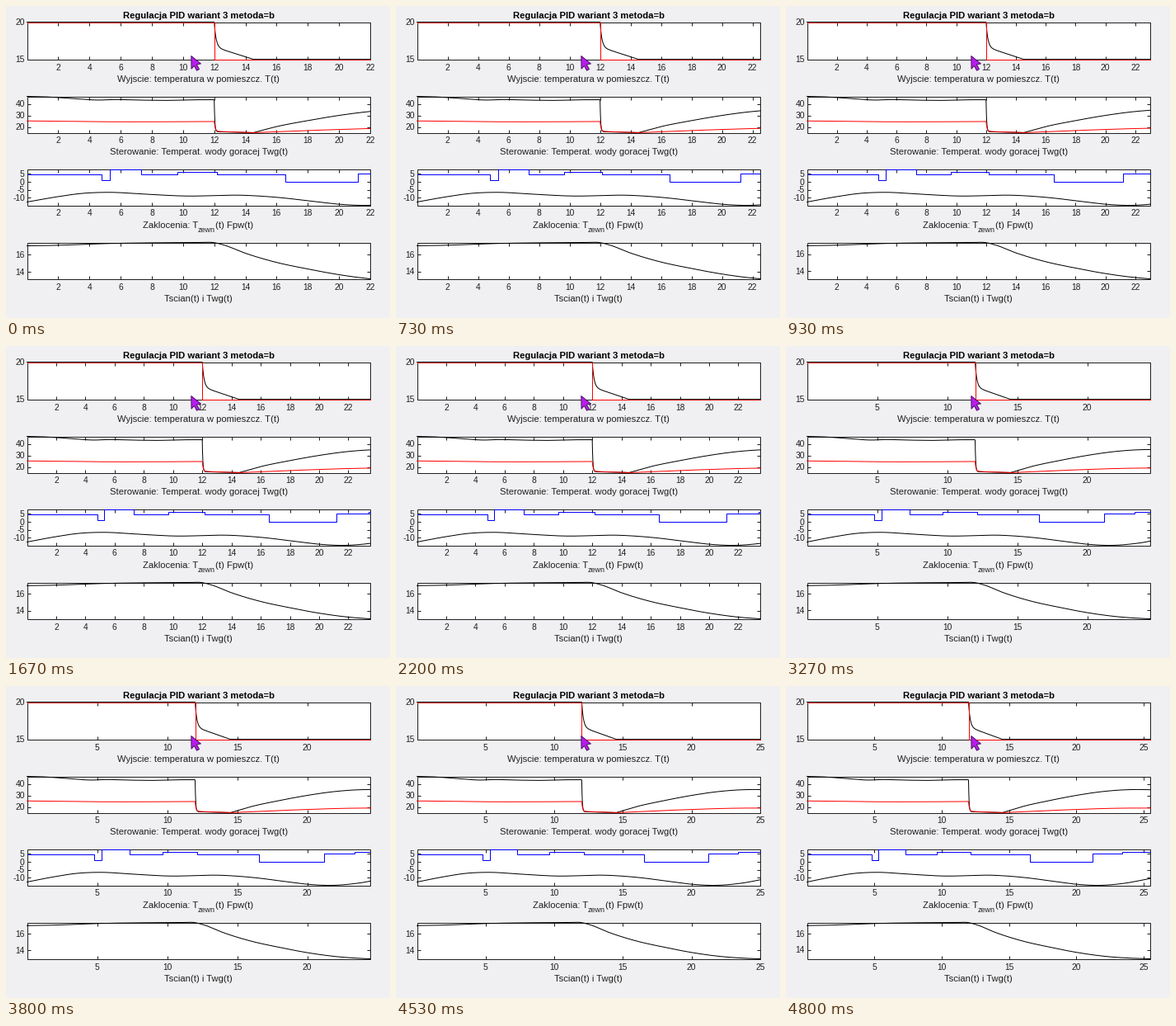
Write a matplotlib script that moves like this. It is 466x378 px and loops after 4990 ms.

```python
import numpy as np
import matplotlib.pyplot as plt
from matplotlib.animation import FuncAnimation
from matplotlib.collections import LineCollection
from matplotlib.patches import Polygon

WIDTH, HEIGHT, DPI = 466, 378, 100
PX = 72 / DPI                       # points per pixel
LOOP_MS, STEP_MS = 4990, 10
LEFT, RIGHT = 25.5, 442.0
STARTS = [0, 200, 930, 1670, 2470, 3270, 4000, 4800]
INK = "#202020"

plt.rcParams["font.family"] = "Liberation Sans"


def smooth(points, t):
    """Cubic Hermite curve through a few (time, value) points."""
    x, y = np.array(points, float).T
    slope = np.gradient(y, x)
    i = np.clip(np.searchsorted(x, t, "right") - 1, 0, len(x) - 2)
    h = x[i + 1] - x[i]
    s = (t - x[i]) / h
    return ((1 + 2 * s) * (1 - s) ** 2 * y[i] + s * (1 - s) ** 2 * h * slope[i]
            + s * s * (3 - 2 * s) * y[i + 1] + s * s * (s - 1) * h * slope[i + 1])


def steps(edges, levels):
    """Vertices of a staircase with the given inner edges."""
    x = np.repeat([0, *edges, 25.5], 2)[1:-1]
    return x, np.repeat(levels, 2)


t = np.arange(0, 25.501, 0.02)
decay = np.exp(-np.maximum(t - 12, 0) / 0.12)
fading = np.clip((14.5 - t) / 2.5, 0, 1)

room = np.where(t < 12, 20, 15 + 1.65 * fading + 3.35 * decay)
water_day = smooth([(0, 46.5), (1, 46.2), (3, 44.6), (4.6, 43.3), (5.5, 43.7),
                    (7.5, 43.2), (9, 43), (10.5, 43.5), (12, 43.6)], np.minimum(t, 12))
water_night = smooth([(14.5, 15), (16, 20.3), (18, 25.5), (20, 30), (22, 33.4),
                      (23.5, 34.8), (24.7, 35.1), (25.5, 34.9)], np.maximum(t, 14.5))
water = np.where(t < 12, water_day, water_night + 0.9 * fading + 27 * decay ** 3)
back_day = smooth([(0, 25.2), (2, 25), (5, 24.5), (9, 24.5), (12, 24.7)], np.minimum(t, 12))
back_night = smooth([(14.5, 15), (18, 16.9), (20, 17.8), (22, 18.6), (24, 19),
                     (25.5, 19)], np.maximum(t, 14.5))
back = np.where(t < 12, back_day, back_night + 1.2 * fading + 8.5 * decay ** 2)
outside = smooth([(0, -12.7), (2, -9.3), (3.5, -7.3), (5.2, -6.6), (7.5, -7.7),
                  (10, -8.9), (14, -8.5), (16.5, -10.2), (18, -11.9), (20, -14.1),
                  (21.7, -14.8), (23.5, -13.6), (25.5, -10.5)], t)
wall = smooth([(0, 17), (1, 17.02), (3, 17.12), (5, 17.25), (8, 17.34), (11, 17.37),
               (12, 17.36), (12.6, 17.1), (14, 16.15), (16, 15.1), (18, 14.35),
               (20, 13.7), (22, 13.23), (24, 12.98), (25.5, 12.9)], t)
flow = steps([4.8, 5.3, 7.3, 9.65, 12.15, 16.55, 21.2, 23.4],
             [4.7, 1, 8.1, 4.5, 6.2, 4.6, 0, 5, 6.4])

fig = plt.figure(figsize=(WIDTH / DPI, HEIGHT / DPI), dpi=DPI, facecolor="#f0eff1")
ax = fig.add_axes([0, 0, 1, 1])
ax.set(xlim=(0, WIDTH), ylim=(HEIGHT, 0))
ax.axis("off")


def write(x, y, text="", size=11.2, ha="center", **style):
    return ax.text(x, y, text, fontsize=size * PX, ha=ha, va="baseline",
                   color=INK, **style)


class Panel:
    def __init__(self, top, bottom, low, high, yticks, curves, shrink=None):
        self.top, self.bottom, self.low, self.high = top, bottom, low, high
        self.yticks, self.curves, self.shrink = yticks, curves, shrink
        ax.add_patch(Polygon([(LEFT, top), (RIGHT, top), (RIGHT, bottom), (LEFT, bottom)],
                             facecolor="white", edgecolor=INK, lw=PX, zorder=1))
        self.ticks = LineCollection([], colors=INK, linewidths=PX, zorder=2)
        ax.add_collection(self.ticks)
        self.lines = [ax.plot([], [], color=color, lw=PX, zorder=3)[0]
                      for _, _, color in curves]
        self.xlabels = [write(0, bottom + 13, size=10.2) for _ in range(12)]
        self.ylabels = [write(22.8, 0, str(v), 10.2, "right") for v in yticks]

    def show(self, span):
        low = np.interp(span, t, self.shrink) if self.shrink is not None else self.low

        def px(time):
            return LEFT + (RIGHT - LEFT) * time / span

        def py(value):
            return self.bottom - (self.bottom - self.top) * (value - low) / (self.high - low)

        for line, (x, y, _) in zip(self.lines, self.curves):
            n = np.searchsorted(x, span + 1e-6)
            x = np.append(x[:n], span)
            y = np.append(y[:n], y[min(n, len(y) - 1)])
            line.set_data(px(x), py(y))

        gap = 2 if span <= 24 else 5
        xticks = np.arange(gap, span + 0.01, gap)
        marks = []
        for v, label in zip(self.yticks, self.ylabels):
            y = py(v)
            label.set_y(y + 3.7)
            marks += [[(LEFT, y), (LEFT + 4, y)], [(RIGHT - 4, y), (RIGHT, y)]]
        for label in self.xlabels:
            label.set_text("")
        for v, label in zip(xticks, self.xlabels):
            x = px(v)
            label.set_x(x)
            label.set_text(str(int(v)))
            marks += [[(x, self.bottom), (x, self.bottom - 4)],
                      [(x, self.top), (x, self.top + 4)]]
        self.ticks.set_segments(marks)


setpoint = steps([12], [20, 15])
panels = [
    Panel(19.5, 64.5, 15, 20, [15, 20], [(t, room, "black"), (*setpoint, "red")]),
    Panel(109.5, 153.5, 15, 46.5, [20, 30, 40], [(t, water, "black"), (t, back, "red")]),
    Panel(197.5, 241.5, -14.8, 8.1, [-10, -5, 0, 5],
          [(t, outside, "black"), (*flow, "blue")]),
    Panel(286.5, 330.5, 13, 17.38, [14, 16], [(t, wall, "black")], shrink=wall),
]

write(233.7, 15, "Regulacja PID wariant 3 metoda=b", weight="bold").set_color("black")
write(233.7, 91.5, "Wyjscie: temperatura w pomieszcz. T(t)")
write(233.7, 180.5, "Sterowanie: Temperat. wody goracej Twg(t)")
write(165.5, 269, "Zaklocenia: T", ha="left")
write(232.8, 274, "zewn", 9, "left")
write(254.5, 269, "(t) Fpw(t)", ha="left")
write(233.7, 357.5, "Tscian(t) i Twg(t)")

cursor = [(224.8, 60.5), (236.5, 70), (231.3, 70.8), (234.5, 76.6),
          (231.5, 78.2), (228.4, 72.4), (225, 76.2)]
ax.add_patch(Polygon(cursor, facecolor="#b81cec", edgecolor="#4c1468",
                     lw=PX, zorder=9))


def update(frame):
    stage = np.searchsorted(STARTS, frame * STEP_MS, "right") - 1
    for panel in panels:
        panel.show(22 + 0.5 * stage)
    return []


anim = FuncAnimation(fig, update, frames=LOOP_MS // STEP_MS, interval=STEP_MS,
                     repeat=True, repeat_delay=0, blit=False)
plt.show()
```
